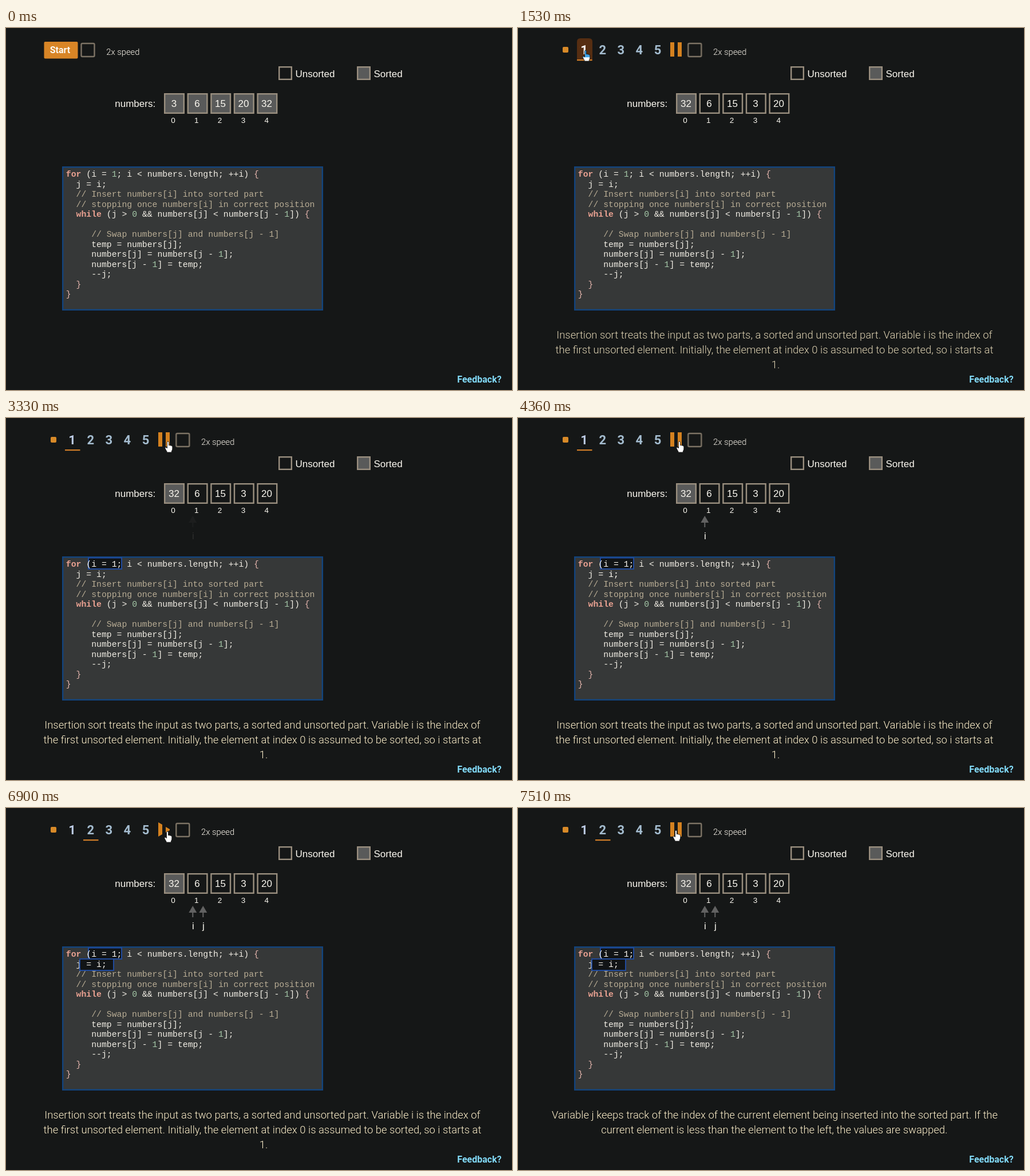
Recreate the animation shown at these times as an HTML page. Size 884 by 633 pixels, loop 8 s.

```html
<!DOCTYPE html>
<html lang="en">
<head>
<meta charset="utf-8">
<title>Insertion sort</title>
<style>
html, body { margin: 0; width: 100%; height: 100%; overflow: hidden; background: #151717; }
svg, pre, #play { position: absolute; }
svg { left: 0; top: 0; width: 884px; height: 633px; }
text { fill: #fbf8f0; white-space: pre; }
.mid { text-anchor: middle; }
.arial { font: 17px "Liberation Sans", Arial, sans-serif; }
.index { font-size: 13.5px; }
.bold { font: 700 16px Roboto, sans-serif; }
.digit { font-size: 22px; fill: #a4bccf; }
.first { fill: #bdcbe4; animation: first 8s step-end infinite; }
.speed { font: 300 14.76px Roboto, sans-serif; fill: #fffaf0; }
.caption { font: 300 18.45px Roboto, sans-serif; }
.caption text { fill: #fff1cc; }
.frame { fill: none; stroke: #9a8f7f; stroke-width: 2.4; }
.grey { fill: #595a5a; }
.pointer path { fill: #626262; }

pre, .over { font: 14.79px "Liberation Mono", "Courier New", monospace; }
pre { left: 104.8px; top: 248px; margin: 0; line-height: 17.5px; color: #f3efe6; }
pre b { color: #eba292; }
pre i { font-style: normal; color: #b9ad95; }
pre u { text-decoration: none; color: #a5c8a8; }
pre s { text-decoration: none; color: #e6b6ae; }

#play {
  left: 266px; top: 25px; height: 25px; box-sizing: border-box;
  border: 0 double transparent; border-width: 0 0 0 20px; border-left-color: #d4811f;
  opacity: 0; animation: on 8s step-end infinite, play 8s linear infinite;
}

.before { animation: off 8s step-end infinite; }
.after { opacity: 0; animation: on 8s step-end infinite; }
.shift { animation: shift 8s step-end infinite; }
.start { fill: #d88526; animation: press 8s step-end infinite; }
.hover { fill: #562e12; opacity: 0; animation: hover 8s linear infinite; }
.line { animation: line 8s step-end infinite; }
#cap1 { animation: cap1 8s ease-in-out infinite; }
#cap2 { animation: cap2 8s ease-in-out infinite; }
#i { animation: i 8s ease-in-out infinite; }
#j { animation: j 8s ease-in-out infinite; }
.box { fill: #111416; stroke: #204a9c; stroke-width: 2; opacity: 0; }
#box1 { animation: box1 8s step-end infinite; }
#box2 { animation: box2 8s step-end infinite; }
#over1 { animation: over1 8s linear infinite; }
#over2 { animation: over2 8s linear infinite; }
#cursor { animation: move 8s ease-out infinite; }
.arrow { opacity: 0; animation: arrow 8s step-end infinite; }
.hand { opacity: 0; animation: hand 8s step-end infinite; }
.tint { stop-color: #3fa2e6; animation: tint 8s step-end infinite; }

@keyframes off { 15.5% { opacity: 0; } }
@keyframes on { 15.5% { opacity: 1; } }
@keyframes shift { 15.5% { transform: translateX(165.8px); } }
@keyframes press { 10.4% { fill: #c0651e; } }
@keyframes hover { 0%, 15.5% { opacity: 0; } 16.5%, 23.5% { opacity: 1; } 24.5%, 100% { opacity: 0; } }
@keyframes first { 15.5% { fill: #fff; } 23.5% { fill: #bdcbe4; } }
@keyframes line { 86.25% { transform: translateX(32px); } }
@keyframes play {
  0%, 75.62% { border-style: double; border-width: 0 0 0 20px; }
  75.63% { border-style: solid; border-width: 0 0 0 20px; }
  79.5%, 86.24% { border-style: solid; border-width: 13px 0 12px 20px; }
  86.25% { border-style: double; border-width: 13px 0 12px 20px; }
  88%, 100% { border-style: double; border-width: 0 0 0 20px; }
}
@keyframes cap1 { 0%, 17.2% { opacity: 0; } 19.8%, 86.9% { opacity: 1; } 90.8%, 100% { opacity: 0; } }
@keyframes cap2 { 0%, 90.9% { opacity: 0; } 93.7%, 100% { opacity: 1; } }
@keyframes i { 0%, 39.4% { opacity: 0; } 49.4%, 100% { opacity: 1; } }
@keyframes j { 0%, 64.8% { opacity: 0; } 74.8%, 100% { opacity: 1; } }
@keyframes box1 { 34% { opacity: .5; } 36.87% { opacity: 1; } }
@keyframes box2 { 58.12% { opacity: .5; } 61% { opacity: 1; } }
@keyframes over1 { 0%, 28.8% { opacity: 0; } 32.1%, 100% { opacity: 1; } }
@keyframes over2 { 0%, 52.9% { opacity: 0; } 56.2%, 100% { opacity: 1; } }
@keyframes arrow { .87% { opacity: 1; } 10.4% { opacity: 0; } }
@keyframes hand { 10.4% { opacity: 1; } }
@keyframes tint { 23.5% { stop-color: #fff; } }
@keyframes move {
  0%, .87% { transform: translate(732px, 479px); }
  5.75%, 7.6% { transform: translate(122px, 5px); }
  13%, 23.2% { transform: translate(118px, 39px); }
  27.5% { transform: translate(288px, 42px); }
  29%, 50.61% { transform: translate(283px, 41px); }
  50.62%, 90.6% { transform: translate(282px, 41px); }
  93.6%, 100% { transform: translate(276px, 39px); }
}
</style>
</head>
<body>
<svg viewBox="0 0 884 633">
  <g class="before">
    <rect class="start" x="66.5" y="24" width="59" height="29.5" rx="2"/>
    <text class="bold mid" x="94.5" y="44.3">Start</text>
  </g>
  <g class="after" id="steps">
    <rect x="78" y="33" width="10" height="10" rx="2" fill="#d88a28"/>
    <path class="hover" d="M103 57V24q0-6 6-6h15q6 0 6 6v33z"/>
    <rect class="line" x="103" y="55" width="26.5" height="2.2" fill="#d07d28"/>
  </g>
  <g class="shift">
    <rect class="frame" x="131.5" y="27" width="23" height="23" rx="2" style="stroke:#7d7365"/>
    <text class="speed" x="175.3" y="46.5">2x speed</text>
  </g>

  <g class="arial">
    <rect class="frame" x="477.200" y="68.200" width="21.600" height="21.600"/>
    <text x="505.5" y="86">Unsorted</text>
    <rect class="frame grey" x="614.200" y="68.200" width="21.600" height="21.600"/>
    <text x="642.5" y="86">Sorted</text>
    <text x="190.3" y="138">numbers:</text>
    <g id="cells"></g>
    <g id="i" class="pointer">
      <path d="M326.3 171l7 12h-6v8h-2v-8h-6z"/>
      <text class="mid" x="326.8" y="212">i</text>
    </g>
    <g id="j" class="pointer">
      <path d="M344.3 171l7 12h-6v8h-2v-8h-6z"/>
      <text class="mid" x="344.8" y="212">j</text>
    </g>
  </g>

  <rect x="99.2" y="243.2" width="453.6" height="249.6" fill="#363838" stroke="#12447e" stroke-width="2.4"/>

  <g class="caption mid">
    <g id="cap1">
      <text x="448" y="543">Insertion sort treats the input as two parts, a sorted and unsorted part. Variable i is the index of</text>
      <text x="448" y="568.7">the first unsorted element. Initially, the element at index 0 is assumed to be sorted, so i starts at</text>
      <text x="450" y="594.5">1.</text>
    </g>
    <g id="cap2">
      <text x="448.5" y="543">Variable j keeps track of the index of the current element being inserted into the sorted part. If the</text>
      <text x="447.8" y="568.7">current element is less than the element to the left, the values are swapped.</text>
    </g>
  </g>
  <text class="bold mid" x="827" y="620" style="fill:#83dcfa">Feedback?</text>
</svg>

<pre><b>for</b> (i = <u>1</u>; i &lt; numbers.length; ++i) <s>{</s>
  j = i;
  <i>// Insert numbers[i] into sorted part</i>
  <i>// stopping once numbers[i] in correct position</i>
  <b>while</b> (j &gt; <u>0</u> &amp;&amp; numbers[j] &lt; numbers[j - <u>1</u>]) <s>{</s>

     <i>// Swap numbers[j] and numbers[j - 1]</i>
     temp = numbers[j];
     numbers[j] = numbers[j - <u>1</u>];
     numbers[j - <u>1</u>] = temp;
     --j;
  <s>}</s>
<s>}</s></pre>

<div id="play"></div>

<svg viewBox="0 0 884 633">
  <defs>
    <linearGradient id="skin" x2="0" y2="1">
      <stop class="tint" offset=".6"/>
      <stop offset=".68" stop-color="#fff"/>
    </linearGradient>
  </defs>
  <g class="over">
    <rect id="box1" class="box" x="144" y="244.500" width="58" height="19.500"/>
    <text id="over1" x="140.300" y="260">(i = 1;</text>
    <rect id="box2" class="box" x="129" y="264" width="59" height="20"/>
    <text id="over2" x="140.300" y="277.500">= i;</text>
  </g>
  <g id="cursor" stroke="#111" stroke-width=".8">
    <path class="arrow" fill="#fff" d="M0 0V16.5l3.8-3.6L6.3 19l2.5-1.1L6.3 12H11.7z"/>
    <path class="hand" fill="url(#skin)" d="M-1.5 1.5a1.5 1.5 0 0 1 3 0V7a1.4 1.4 0 0 1 2.4 .3 1.4 1.4 0 0 1 2.3 .6 1.3 1.3 0 0 1 1.6 1.3V13q0 2-1.5 4v2H-2v-1.5Q-3.5 15.5-5 12a1.3 1.3 0 0 1 2-1.5l1.5 1.5z"/>
  </g>
</svg>

<script>
const label = (cls, x, y, s) => `<text class="mid ${cls}" x="${x}" y="${y}">${s}</text>`;
const sorted = [3, 6, 15, 20, 32];
const shuffled = [32, 6, 15, 3, 20];

document.getElementById('cells').innerHTML = sorted.map((n, k) => {
  const x = 277.2 + 40.6 * k, mid = 293.5 + 40.5 * k;
  const box = cls => `<rect class="${cls}" x="${x}" y="115.2" width="33.6" height="33.6"/>`;
  return box(k ? 'grey before' : 'grey') + box('frame') +
    label('before', mid, 138, n) + label('after', mid, 138, shuffled[k]) +
    label('index', 292 + 40.8 * k, 166, k);
}).join('');

document.getElementById('steps').innerHTML += [1, 2, 3, 4, 5].map(n =>
  label(n === 1 ? 'bold digit first' : 'bold digit', 83.5 + 32.1 * n, 45.8, n)
).join('');
</script>
</body>
</html>
```
